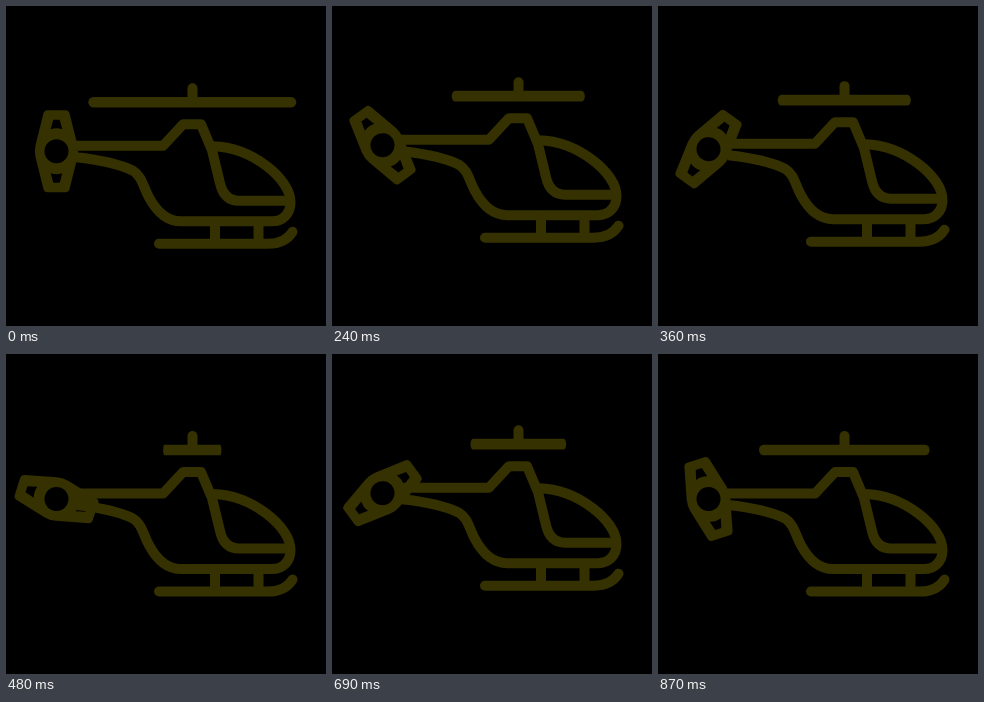
An HTML page for the animation above (0.9 s loop, 320 px wide and 320 px high).

```html
<!DOCTYPE html>
<html lang="en">
<head>
<meta charset="utf-8">
<title>Helicopter</title>
<style>
  html, body { margin: 0; width: 100%; height: 100%; overflow: hidden; background: #000; }
  svg { display: block; width: 100vw; height: 100vh; }
  .line { fill: none; stroke: #353100; stroke-width: 10; stroke-linecap: round; stroke-linejoin: round; }
  .fill { fill: #353100; }
</style>
</head>
<body>
<svg viewBox="0 0 320 320">
  <g id="craft">
    <rect id="blade" class="fill" x="-104" y="-5.3" width="208" height="10.6" rx="5.3"/>
    <path class="line" d="M186.5 82V94"/>
    <path id="tail" class="fill" fill-rule="evenodd"
      d="M-9 -41H9Q12 -41 13 -38L21 -6Q22.3 0 21 6L13 38Q12 41 9 41H-9Q-12 41 -13 38L-21 6Q-22.3 0 -21 -6L-13 -38Q-12 -41 -9 -41Z
         M-12 0A12 12 0 0 0 12 0A12 12 0 0 0 -12 0Z
         M-3.2 -31.5H3.2L5.8 -22Q0 -24 -5.8 -22Z
         M-3.2 31.5H3.2L5.8 22Q0 24 -5.8 22Z"/>
    <g class="line">
      <path stroke-linecap="butt" d="M67 139.5H157L177 118H195L206 144L214 177Q218 194.5 233 194.5H283"/>
      <path stroke-linecap="butt" d="M207 140C246 141 285 173 284.5 196C284.5 207 277 215 266 215H175C160 215 150 204 143 191C137 180 136 170 127 164.5Q108 155 70 151"/>
      <path stroke-linecap="butt" d="M209 215V238M252.5 215V238"/>
      <path d="M153 237.5H262Q279 237.5 286.5 225.5"/>
    </g>
  </g>
</svg>
<script>
  const LOOP = 900, STEP = 30, SPIN = 300, BOB = 450;
  const craft = document.getElementById('craft');
  const blade = document.getElementById('blade');
  const tail = document.getElementById('tail');

  function draw(t) {
    const lift = 3.1 * (1 - Math.cos(2 * Math.PI * t / BOB)) - 0.3;
    const spin = (t % SPIN) / SPIN;
    const width = 0.1 + 0.9 * Math.abs(1 - 2 * spin);
    craft.setAttribute('transform', `translate(0 ${-lift})`);
    blade.setAttribute('transform', `translate(186.3 96) scale(${width} 1)`);
    tail.setAttribute('transform', `translate(50.5 145) rotate(${180 * spin})`);
  }

  function tick() {
    const t = performance.now() % LOOP;
    draw(Math.floor(t / STEP) * STEP);
    requestAnimationFrame(tick);
  }
  tick();
</script>
</body>
</html>
```
